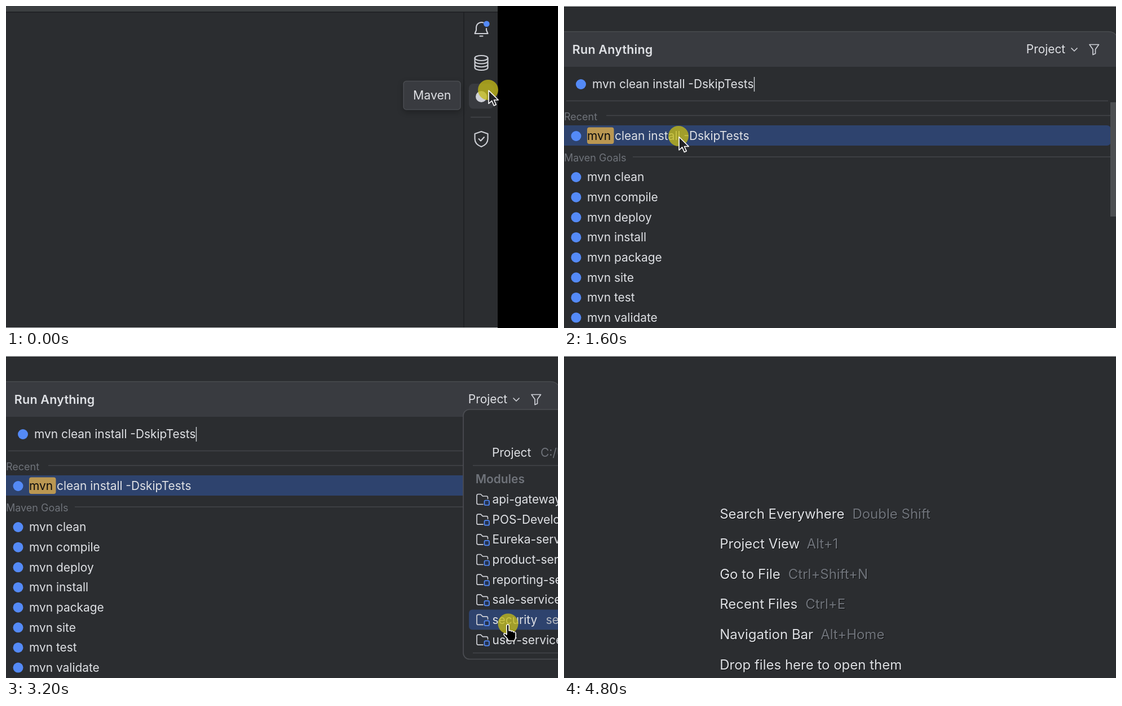
Write an HTML page that moves like this. It is 979 by 572 pixels and loops after 5600 ms.

```html
<!DOCTYPE html>
<html lang="en">
<head>
<meta charset="utf-8">
<title>Run a Maven goal</title>
<style>
  html, body { margin: 0; width: 100%; height: 100%; overflow: hidden; background: #2b2d30; }
  svg { display: block; width: 100%; height: 100%; }
  text { font: 20.9px Inter, sans-serif; font-optical-sizing: none; fill: #dfe1e5; white-space: pre; }

  /* --at: first step, span-n: number of 0.8 s steps on screen */
  .on { visibility: hidden; animation: span-1 5.6s step-end infinite; animation-delay: calc(var(--at) * .8s - 5.6s); }
  .on.two { animation-name: span-2; }
  .on.three { animation-name: span-3; }
  .on.four { animation-name: span-4; }
  .on.five { animation-name: span-5; }
  @keyframes span-1 { 0% { visibility: visible } 14.2857%, 100% { visibility: hidden } }
  @keyframes span-2 { 0% { visibility: visible } 28.5714%, 100% { visibility: hidden } }
  @keyframes span-3 { 0% { visibility: visible } 42.8571%, 100% { visibility: hidden } }
  @keyframes span-4 { 0% { visibility: visible } 57.1429%, 100% { visibility: hidden } }
  @keyframes span-5 { 0% { visibility: visible } 71.4286%, 100% { visibility: hidden } }

  .icon { fill: none; stroke: #ced0d6; stroke-width: 1.7; stroke-linecap: round; stroke-linejoin: round; }
  .bold { stroke-width: 2.1; }
  .blue { stroke: #548af7; }
  .edge { fill: none; stroke: #1e1f22; stroke-width: 1.5; }
  .rule { fill: none; stroke: #43454a; stroke-width: 1.5; }
  .rim { stroke: #c8c9ca; }
  .caret { stroke: #ced0d6; stroke-width: 1.4; }
  .tip { fill: #393b40; stroke: #4a4c51; stroke-width: 1.5; filter: drop-shadow(0 4px 5px #0004); }
  .dot { fill: #548af7; }
  .pick { fill: #2e436e; }
  .halo { fill: #c4ba18; fill-opacity: .77; }
  .pointer { fill: #222326; stroke: #fff; stroke-width: 1.6; stroke-linejoin: round; }
  .dim { fill: #6f737a; }
  .tipText { font-size: 21.3px; }
  .title { font-size: 21.5px; font-weight: 600; letter-spacing: .2px; }
  .head { font-size: 22px; font-weight: 600; letter-spacing: .5px; }
  .group { font-weight: 600; }
  .small { font-size: 18px; }
  #hints { filter: drop-shadow(1px 1px 0 #0009); }
  #hints text { font-size: 24px; }
</style>
</head>
<body>
<svg viewBox="0 0 979 572" xmlns="http://www.w3.org/2000/svg">
  <defs>
    <path id="arrow" class="pointer" d="M0 0V23.5L5.6 18.4 9.4 27 13.2 25.3 9.5 17H17.2Z"/>
    <path id="folder" d="M1 9h-8.500a2.500 2.500 0 0 1-2.500-2.500v-13a2.500 2.500 0 0 1 2.500-2.500h4.500l3.500 3.500h6.500a2.500 2.500 0 0 1 2.500 2.500v2"/>
    <g id="module" class="icon">
      <use href="#folder"/>
      <rect class="blue" x="3.500" y="2" width="8.500" height="8.500" rx="2" fill="#25324d"/>
    </g>
    <path id="chevron" class="icon" d="M-5-2.500 0 2.500 5-2.500"/>
    <path id="beam" d="M345.500 143.500h4.500l2 1.500 2-1.500h4.500M345.500 164.500h4.500l2-1.500 2 1.500h4.500M352 145v18"/>
  </defs>

  <rect width="979" height="572" fill="#2b2d30"/>

  <!-- IDE window -->
  <g class="on two" style="--at:0">
    <rect x="872" width="107" height="572" fill="#000"/>
    <rect class="on" style="--at:0" width="872" height="10" fill="#3c3f41"/>
    <path class="edge" d="M0 10.800H872M812 11V571"/>
    <path class="rim" d="M0 571.500H872"/>
    <g class="icon bold">
      <path d="M846.500 29.500A9.500 9.500 0 0 0 834 38v5l-2.500 6h23l-2.500-6v-3"/>
      <path d="M840.500 53.500h5"/>
      <ellipse cx="843" cy="92.500" rx="11.500" ry="4.500"/>
      <path d="M831.500 92.500v17c0 6 23 6 23 0v-17M831.500 98c0 6 23 6 23 0M831.500 103.700c0 6 23 6 23 0"/>
      <path d="M843 223l11.500 4v9c0 7-5 11.500-11.500 14-6.500-2.500-11.500-7-11.500-14v-9zM838.500 236l3.500 3.500 6-6.500"/>
    </g>
    <circle class="dot" cx="852.300" cy="31.800" r="5.300"/>
    <path class="rule" d="M824 197.500H860"/>
  </g>

  <g class="on" style="--at:0">
    <rect x="821" y="138" width="44" height="44.500" rx="8" fill="#393b40"/>
    <circle cx="843" cy="161" r="10" fill="#ced0d6"/>
    <rect class="tip" x="705" y="133.500" width="101" height="50.500" rx="5"/>
    <text class="tipText" x="722" y="166">Maven</text>
    <circle class="halo" cx="855" cy="149" r="18"/>
    <use href="#arrow" x="856" y="150"/>
  </g>

  <!-- Maven tool window -->
  <g class="on" style="--at:1">
    <path class="edge" d="M199.500 11V571M200 71.500H812"/>
    <rect x="821" y="138" width="44" height="44.500" rx="8" fill="#3574f0"/>
    <circle cx="843" cy="161" r="10" fill="#fff"/>
    <path d="M872.500 164l1.500 4" stroke="#fff"/>
    <text class="head" x="217.700" y="48.500">Maven</text>
    <g fill="#ced0d6"><circle cx="742" cy="34.500" r="1.700"/><circle cx="742" cy="41.500" r="1.700"/><circle cx="742" cy="48.500" r="1.700"/></g>
    <path class="icon" d="M773 41.500h17"/>
    <path class="rule" d="M333.500 83v28M381.500 83v28M585.500 83v28M673.500 83v28"/>
    <rect x="428" y="82" width="33" height="33" rx="6" fill="#43454a"/>
    <path d="M398.500 88.500v20l16.500-10z" fill="#5f6166" stroke="#5f6166" stroke-width="2" stroke-linejoin="round"/>
    <g class="icon">
      <path transform="translate(231 98.500)" d="M-9 1a9 9 0 0 1 16.500-6M9-1a9 9 0 0 1-16.500 6M-12-2.500l3 3.500 4-3M12 2.500l-3-3.500-4 3"/>
      <use href="#folder" x="269" y="98"/>
      <path class="blue" transform="translate(275.500 104)" d="M-5.500-.5a5.500 5 0 0 1 10-2.500v-3M5.500.5a5.500 5 0 0 1-10 2.500v3M4.500-3h-3M-4.500 3h3"/>
      <path d="M309 89v12M303.500 96l5.500 5.500 5.500-5.500M300 102v5h16"/>
      <path d="M347 98.500h18M356 89.500v18"/>
      <rect x="435.500" y="89.500" width="19" height="18" rx="3"/>
      <path d="M436 94.500h18M441.500 97.500v7l5.500-3.500z"/>
      <path d="M479 91c5-4 11-1 11.500 4 6 1 6 7 2.500 9.500M488 106.500h-10c-7 0-7.500-9-1-10M474 88.500l20 20"/>
      <circle cx="522.500" cy="98.500" r="9.500"/>
      <path d="M516 105l13-13"/>
      <path d="M555.500 89.500l5.500 5.500 5.500-5.500M555.500 108l5.500-5.500 5.500 5.500"/>
      <path d="M603 94a7 7 0 1 1 8 9.500M614 103l4 5"/>
      <path class="blue" d="M600 99v9M604 96v12M608 101v7"/>
      <path d="M638.500 89.500h19M638.500 107.500h19"/>
      <path class="blue" d="M643.500 104V93.500M640.500 96.500l3-3 3 3M652.500 104V93.500M649.500 96.500l3-3 3 3"/>
      <path d="M695 89h5.500l1.500 3 3.500-.5 2.500 4.500-2 2.500 2 3-2.500 4-3.500-.2-1.500 3h-5.500l-1.500-3-3.500.2-2.500-4 2-3-2-2.500 2.500-4.500 3.500.5z"/>
      <circle cx="697.500" cy="98.500" r="3.300"/>
      <use href="#folder" x="261" y="149"/>
      <path class="blue" d="M264 155l3 3.500 5.500-6.500"/>
    </g>
    <path d="M321 104v6h-6zM710 104v6h-6z" fill="#ced0d6"/>
    <g id="tree"></g>
    <rect class="tip" x="425.700" y="136.500" width="237.500" height="50" rx="5"/>
    <text class="tipText" x="441.700" y="168.700">Execute Maven Goal</text>
    <circle class="halo" cx="441" cy="101.500" r="18"/>
    <use href="#arrow" x="442" y="104.500"/>
  </g>

  <!-- Run Anything popup -->
  <path class="on five rim" style="--at:2" d="M0 .5H979"/>
  <g class="on four" style="--at:2">
    <path d="M0 45.500H966Q976 46 979 52V108H0Z" fill="#393b40"/>
    <path d="M0 45.500H966Q976 46 979 52" fill="none" stroke="#4a4c50" stroke-width="1.500"/>
    <text class="title" x="14.800" y="85">Run Anything</text>
    <rect class="on" style="--at:3" x="809.500" y="60" width="108.500" height="32.500" rx="6" fill="#55575c"/>
    <text class="on three" style="--at:2" x="819.800" y="83.500">Project</text>
    <g class="on" style="--at:5">
      <use href="#module" x="796" y="77"/>
      <text x="811.500" y="83.500">security</text>
    </g>
    <use href="#chevron" x="905" y="77.500"/>
    <path class="icon" d="M932 68.500h16.500l-6 8.500v7.500l-4.500 2v-9.500z"/>
    <circle class="dot" cx="30" cy="139" r="9"/>
    <text x="50" y="146">mvn clean install -DskipTests</text>
    <path class="on caret" style="--at:2" d="M337.500 126v26"/>
    <path class="on two caret" style="--at:4" d="M337.500 126v26"/>
    <path class="rule" d="M4 168.500H965M75 194.500H969M122 268H969"/>
    <text class="small dim" x="0" y="202.500">Recent</text>
    <text class="small dim" x="0" y="276">Maven Goals</text>
    <rect class="pick" x="-10" y="212" width="980" height="36" rx="7"/>
    <rect x="41" y="215.500" width="47.500" height="29.500" rx="4" fill="#ba9752"/>
    <circle class="dot" cx="21.500" cy="231" r="9"/>
    <text x="41" y="238"><tspan fill="#0b0b0c">mvn</tspan><tspan dx="1"> clean install -DskipTests</tspan></text>
    <g id="goals"></g>
    <rect x="969" y="171" width="10" height="203" fill="#4d4f52"/>
  </g>

  <g class="on" style="--at:2">
    <circle class="halo" cx="203" cy="231" r="18"/>
    <use href="#arrow" x="204" y="232.500"/>
  </g>
  <g class="on" style="--at:3">
    <circle class="halo" cx="894" cy="91" r="18"/>
    <use href="#arrow" x="895" y="92"/>
  </g>

  <!-- module picker -->
  <g class="on" style="--at:4">
    <rect x="811" y="95" width="200" height="443.500" rx="11" fill="#2b2d30" stroke="#4b4d52" stroke-width="1.700"/>
    <text x="862" y="178.500">Project</text>
    <text class="dim" x="948" y="178.500">C:/Users</text>
    <path class="rule" d="M828 194.500H979M828 527.500H979"/>
    <text class="group dim" x="832.800" y="226">Modules</text>
    <rect class="pick" x="821" y="450.500" width="180" height="35.700" rx="6"/>
    <g id="modules"></g>
    <text x="957.500" y="475.800" style="fill:#b4b8bf">security</text>
    <circle class="halo" cx="890.500" cy="475.500" r="18"/>
    <path class="pointer" style="fill:#000" transform="translate(882 477)"
      d="M6 18V2.500Q6 0 8 0T10 2.500V11Q13.500 9.500 14 12 17.500 10.500 18 13.500 22 12.500 22 16V21Q22 25 19.500 29H9Q8 25 2 19.500 0 17 2 15.500 4 15.500 6 18Z"/>
  </g>

  <!-- text cursor -->
  <g class="on" style="--at:5" fill="none">
    <use href="#beam" stroke="#111" stroke-width="4.500"/>
    <use href="#beam" stroke="#fff" stroke-width="2"/>
  </g>

  <!-- empty editor -->
  <g id="hints" class="on" style="--at:6"></g>
</svg>

<script>
  const fill = (id, items, row) => {
    document.getElementById(id).innerHTML = items.map(row).join('');
  };
  const label = (x, y, s) => `<text x="${x}" y="${y}">${s}</text>`;
  const dot = (x, y) => `<circle class="dot" cx="${x}" cy="${y}" r="9"/>`;
  const pitch = 35.66;

  fill('tree', ['Profiles', 'api-gateway', 'Jorv Springboot New', 'Eureka-server', 'product-service',
    'reporting-service', 'sales-service', 'security', 'user-service'], (name, i) => {
    const y = 148.5 + i * pitch;
    return `<path class="icon" d="M228 ${y - 5}l5 5-5 5"/>` +
      (i ? dot(262, y) : '') + label(278, y + 7.4, name);
  });

  fill('goals', ['clean', 'compile', 'deploy', 'install', 'package', 'site', 'test', 'validate'], (goal, i) => {
    const y = 304 + i * pitch;
    return dot(21.5, y) + label(41, y + 7.4, 'mvn ' + goal);
  });

  fill('modules', ['api-gateway', 'POS-Development', 'Eureka-server', 'product-service',
    'reporting-service', 'sale-service', 'security', 'user-service'], (name, i) => {
    const y = 254.5 + i * pitch;
    return `<use href="#module" x="845" y="${y}"/>` + label(862.6, y + 7.4, name);
  });

  fill('hints', [['Search Everywhere', 'Double Shift'], ['Project View', 'Alt+1'], ['Go to File', 'Ctrl+Shift+N'],
    ['Recent Files', 'Ctrl+E'], ['Navigation Bar', 'Alt+Home'], ['Drop files here to open them', '']],
    ([name, keys], i) => label(276.2, 288.8 + i * 53.55, `${name}<tspan class="dim" dx="14">${keys}</tspan>`));
</script>
</body>
</html>
```
